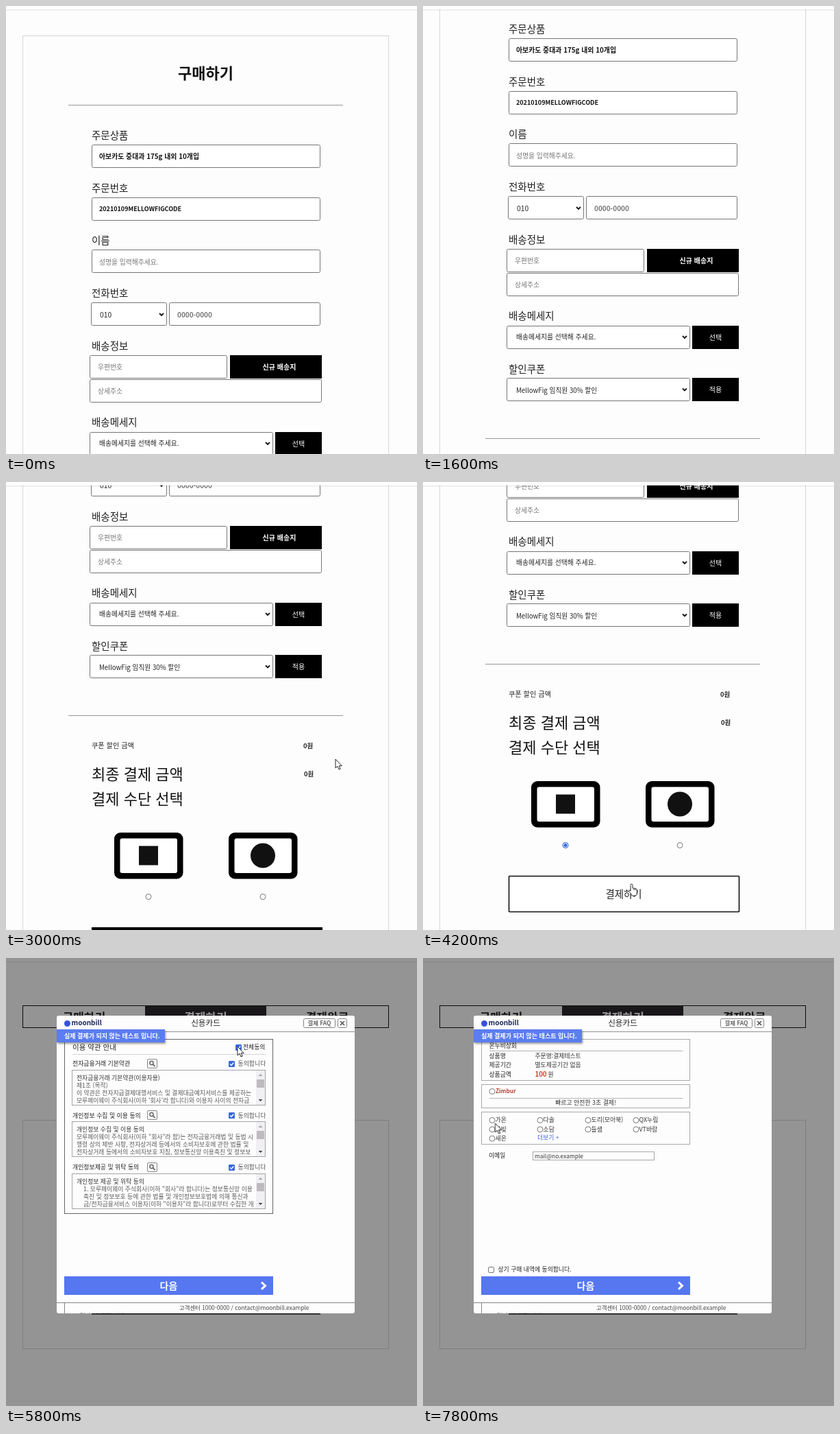
An HTML page for the animation above (8000 ms loop, 600x653 px).

```html
<!DOCTYPE html>
<html lang="ko">
<head>
<meta charset="utf-8">
<title>구매하기</title>
<style>
html, body { margin: 0; width: 100%; height: 100%; overflow: hidden; background: #fefdfe; }
svg { display: block; width: 600px; height: 653px; }
text { font-family: "Noto Sans CJK KR", "Noto Sans CJK", "Noto Sans", sans-serif; white-space: pre; }
.step { animation: 8s step-end infinite; }
</style>
</head>
<body>
<svg id="stage" viewBox="0 0 600 653"></svg>
<script>
const PAGE = '#fefdfe', INK = '#222', GREY = '#757575', BLUE = '#5677f0';

// Drawing helpers; text is placed by the vertical middle of its line.
const text = (x, mid, size, str, fill = INK, weight = 400, anchor = 'start') =>
  `<text x="${x}" y="${(mid + size * .38).toFixed(1)}" font-size="${size}" fill="${fill}" font-weight="${weight}" text-anchor="${anchor}">${str}</text>`;
const centred = (x, mid, size, str, fill, weight) => text(x, mid, size, str, fill, weight, 'middle');
const fillBox = (x, y, r, b, fill, round = 0) =>
  `<rect x="${x}" y="${y}" width="${r - x}" height="${b - y}" rx="${round}" fill="${fill}"/>`;
const frame = (x, y, r, b, stroke = '#767676', round = 0, fill = 'none', width = 1) =>
  `<rect x="${x + .5}" y="${y + .5}" width="${r - x - 1}" height="${b - y - 1}" rx="${round}" fill="${fill}" stroke="${stroke}" stroke-width="${width}"/>`;
const path = (d, stroke, width = 1, fill = 'none') =>
  `<path d="${d}" fill="${fill}" stroke="${stroke}" stroke-width="${width}"/>`;
const rule = (x, r, y, stroke) => path(`M${x} ${y + .5}H${r}`, stroke);
const radio = (x, y) => `<circle cx="${x}" cy="${y}" r="4" fill="#fff" stroke="#767676"/>`;
const group = (id, body) => `<g id="${id}" class="step">${body}</g>`;

// Stepped keyframes from [ms, value] pairs.
const rules = [];
function track(id, prop, keys) {
  const body = keys.map(([ms, v]) => `${ms / 80}%{${prop}:${v}}`).join('');
  rules.push(`@keyframes ${id}{${body}}#${id}{animation-name:${id}}`);
}
const visible = (id, ...times) =>
  track(id, 'opacity', [[0, 0], ...times.map((ms, i) => [ms, 1 - i % 2])]);
const move = (id, keys) =>
  track(id, 'transform', keys.map(([ms, x, y]) => [ms, `translate(${x}px,${y}px)`]));

// Order form
const label = (mid, str) => text(125, mid, 14.5, str, INK, 300);
const field = (x, y, r) => frame(x, y, r, y + 34, '#767676', 2, '#fff');
const chevron = (x, y) => path(`M${x - 3} ${y - 1.5}l3 3l3 -3`, '#111', 1.8);
const darkButton = (x, y, r, str, mid, weight) =>
  fillBox(x, y, r, y + 34, '#000') + centred(mid, y + 17, 10, str, '#fff', weight);
const payCard = (x, mark) =>
  fillBox(x, 956, x + 100.5, 1023.5, '#000', 9) + fillBox(x + 8.5, 964.5, x + 92, 1015, '#fff', 3) + mark;

const form = [
  frame(24, 43, 559, 1400, '#d6d4dc'),
  centred(291.5, 97.5, 22, '구매하기', '#111', 700),
  rule(91, 492, 144, '#98969a'),
  label(188, '주문상품'), field(125, 202, 459),
  text(136, 219, 9.9, '아보카도 중대과 175g 내외 10개입', '#111', 700),
  label(265, '주문번호'), field(125, 279, 459),
  text(136, 296, 9, '20210109MELLOWFIGCODE', '#111', 700),
  label(341.5, '이름'), field(125, 355, 459),
  text(136, 373, 9.8, '성명을 입력해주세요.', GREY),
  label(418, '전화번호'), field(124, 432, 235), field(238, 432, 459),
  text(137, 450, 10.3, '010'), chevron(227, 449.5),
  text(250, 450, 10, '0000-0000', GREY, 700),
  label(495, '배송정보'), field(122, 509, 323), field(122, 544, 461),
  text(134, 526.5, 9.8, '우편번호', GREY),
  darkButton(327, 509, 461, '신규 배송지', 399, 700),
  text(134, 561, 9.8, '상세주소', GREY),
  label(606.5, '배송메세지'), field(122, 621, 390), chevron(382, 637.5),
  text(136, 637.5, 9.8, '배송메세지를 선택해 주세요.'),
  darkButton(393, 621, 461, '선택', 427, 400),
  label(684, '할인쿠폰'), field(122, 697, 390), chevron(382, 714),
  text(136, 715, 9.7, 'MellowFig 임직원 30% 할인'),
  darkButton(393, 697, 461, '적용', 427, 400),
  rule(91, 492, 785, '#98969a'),
  text(125, 829.5, 10.2, '쿠폰 할인 금액'), text(434, 829.5, 9.4, '0원', INK, 700),
  text(125, 870.5, 22, '최종 결제 금액', '#111', 300), text(435, 870.5, 9.4, '0원', INK, 700),
  text(125, 906.5, 22, '결제 수단 선택', '#111', 300),
  payCard(158, fillBox(194, 975.5, 222, 1003.5, '#111')),
  payCard(325, '<circle cx="375" cy="989.5" r="18" fill="#111"/>'),
  radio(208, 1049.5), radio(375, 1049.5),
  group('chosen', '<circle cx="208" cy="1049.5" r="4" fill="#fff" stroke="#2f6be6"/><circle cx="208" cy="1049.5" r="2.5" fill="#2f6be6"/>'),
  fillBox(125, 1094, 462, 1147, '#000'), centred(293, 1120.5, 14.4, '결제하기', '#fff', 300),
  group('hover', frame(125, 1094, 462, 1147, '#111', 1, '#fff', 1.6) + centred(293, 1120.5, 14.4, '결제하기', INK, 300)),
].join('');

// Checkout page behind the popup
const checkout = [
  fillBox(0, 0, 600, 653, PAGE),
  frame(24, 69, 559, 102, '#111'), fillBox(203, 69, 380, 102, '#2b282d'),
  centred(114, 86, 17, '구매하기', INK, 700),
  centred(291.5, 86, 17, '결제하기', '#fff', 700),
  centred(469, 86, 17, '결제완료', INK, 700),
  frame(24, 236, 559, 570, '#d6d4dc'),
  fillBox(125, 466, 459, 519.5, '#111'),
].join('');

const header = fillBox(0, 0, 600, 5, PAGE) + fillBox(0, 5, 600, 6, 'rgba(0,0,0,.07)') + fillBox(0, 6, 600, 7, 'rgba(0,0,0,.04)');

// Popup
const box = (x, y) => frame(x, y, x + 9, y + 9, '#767676', 1.5, '#fff');
const tick = (x, y) => fillBox(x, y, x + 9, y + 9, '#3867e0', 1.5) + path(`M${x + 2} ${y + 4.5}l2 2l3.3 -4`, '#fff', 1.4);
const lens = y => frame(206, y - 7, 221, y + 7, '#8a8a8a', 1.5, '#f4f4f4') +
  `<circle cx="212.5" cy="${y - 1}" r="2.6" fill="none" stroke="#555" stroke-width="1.2"/>` + path(`M214.5 ${y + 1}l3 3`, '#555', 1.6);

function term(y, title, lines, indent) {
  const top = Math.floor(y) + 9;
  const bar = fillBox(365, top + 1, 378, top + 51, '#f0eff1') + fillBox(366, top + 14, 377, top + 26, '#bdbbbe') +
    `<path d="M368.500 ${top + 9}h6l-3 -3z" fill="#a3a3a3"/><path d="M368.500 ${top + 43}h6l-3 3z" fill="#444"/>`;
  return text(97, y, 8.9, title, INK, 500) + lens(Math.floor(y)) + box(325, Math.floor(y) - 4) + text(338.5, y, 8.9, '동의합니다', '#555') +
    frame(96, top, 379, top + 52, '#a5a3a6') + bar +
    lines.map((s, i) => text(i ? 103 + indent : 103, top + 11.5 + i * 11.2, 8.8, s, i ? '#5a5a5a' : '#333')).join('');
}

const terms = [
  frame(85, 118, 390, 373, '#666'),
  text(97, 130, 10.5, '이용 약관 안내'), box(335, 126), text(346, 130, 8.8, '전체동의', INK, 500),
  rule(97, 379, 140, '#d5d3d6'),
  term(154, '전자금융거래 기본약관', ['전자금융거래 기본약관(이용자용)', '제1조 (목적)',
    '이 약관은 전자지급결제대행서비스 및 결제대금예치서비스를 제공하는',
    "모루페이웨이 주식회사(이하 '회사'라 합니다)와 이용자 사이의 전자금"], 0),
  term(229.5, '개인정보 수집 및 이용 동의', ['개인정보 수집 및 이용 동의',
    '모루페이웨이 주식회사(이하 "회사"라 함)는 전자금융거래법 및 동법 시',
    '행령 상의 제반 사항, 전자상거래 등에서의 소비자보호에 관한 법률 및',
    '전자상거래 등에서의 소비자보호 지침, 정보통신망 이용촉진 및 정보보'], 0),
  term(305, '개인정보제공 및 위탁 동의', ['개인정보 제공 및 위탁 동의',
    '1. 모루페이웨이 주식회사(이하 "회사"라 합니다)는 정보통신망 이용',
    '촉진 및 정보보호 등에 관한 법률 및 개인정보보호법에 의해 통신과',
    '금/전자금융서비스 이용자(이하 "이용자"라 합니다)로부터 수집한 개'], 10),
  group('ticks', tick(335, 126) + [150, 225, 301].map(y => tick(325, y)).join('')),
].join('');

const banks = ['가온', '다솔', '도리(모아북)', 'QX누림', '나빛', '소담', '들샘', 'VT바람', '새온'];
const bank = (name, i) => {
  const x = 101 + i % 4 * 70, y = 236.5 + Math.floor(i / 4) * 13.3;
  return radio(x, y) + text(x + 4.5, y - .7, 8.9, name, '#333');
};

const order = [
  fillBox(80, 119, 394, 380, PAGE),
  frame(85, 118, 390, 179, '#a9a7aa'),
  text(96.5, 128, 8.8, '온누비상회', INK, 500), rule(97, 379, 135, '#b5b3b6'),
  text(96.5, 142.5, 8.8, '상품명', INK, 500), text(163.5, 142.5, 8.8, '주문명:결제테스트', '#333'),
  text(96.5, 156, 8.8, '제공기간', INK, 500), text(163.5, 156, 8.8, '별도제공기간 없음', '#333'),
  text(96.5, 169.5, 8.8, '상품금액', INK, 500), text(163.5, 169.5, 9.6, '100', '#d2401c', 700),
  text(182.5, 169.5, 8.8, '원', '#333'),
  frame(85, 184, 390, 219, '#a9a7aa'), radio(101, 194.5),
  text(106, 194, 8.2, 'Zimbur', '#b8423a', 700), rule(97, 379, 204, '#b5b3b6'),
  centred(237.5, 210.5, 8.9, '빠르고 안전한 3초 결제!', '#333'),
  frame(85, 224, 390, 272, '#a9a7aa'), banks.map(bank).join(''),
  text(167, 262, 8.8, '더보기 +', '#3f62d8'),
  text(96, 288, 8.8, '이메일', INK, 500), frame(160, 282, 338, 295, '#a9a7aa'),
  text(163, 288.5, 8.4, 'mail@no.example', '#333'),
  box(95, 450), text(109.5, 453.5, 8.8, '상기 구매 내역에 동의합니다.'),
].join('');

const popupBody = [
  '<circle cx="89.500" cy="95.500" r="4.500" fill="#3652dc"/>',
  text(95.5, 94.5, 10, 'moonbill', '#1e2a5a', 700),
  centred(291.5, 95, 11.6, '신용카드'),
  frame(434, 88, 481, 102, '#858386', 2, '#fff'), centred(457.5, 95, 8.4, '결제 FAQ', '#666', 700),
  frame(484, 88, 498, 102, '#858386', 2, '#fff'), path('M488 92l6 6M494 92l-6 6', '#555', 1.7),
  rule(74, 509, 107, '#8f8d92'),
  terms, group('order', order),
  '<rect x="74" y="104" width="158" height="19" fill="#5b7df0" style="filter:drop-shadow(1px 2px 1.5px rgba(0,0,0,.4))"/>',
  text(85, 113.5, 9, '실제 결제가 되지 않는 테스트 입니다.', '#fff', 700),
  fillBox(85, 464, 390, 491, BLUE), centred(237.5, 477.5, 14, '다음', '#fff', 700),
  path('M373 472.500l5.500 5.200l-5.500 5.200', '#fff', 3),
  rule(74, 509, 502, '#858386'), path('M85.500 502V518', '#858386'),
  text(253, 510, 8.4, '고객센터 1000-0000 / contact@moonbill.example', '#444'),
  text(96, 521.5, 9, '◦ 결제 안내(일시불)', '#666'),
].join('');

// The loader washes the popup out so that its white equals the dimmed page.
const popup = fillBox(74, 84, 509, 518, PAGE, 3) +
  `<g clip-path="url(#sheet)">${group('content', popupBody)}</g>` +
  group('loader', fillBox(74, 84, 509, 518, 'rgba(76,75,76,.59)', 3) +
    `<g transform="translate(289.500 302)">${group('spin', path('M11 -6A12.500 12.500 0 0 1 -3.500 12', '#5b7cf0', 3))}</g>`);

const arrow = '<path d="M0 0V13L3 10.300L5 15L7.200 14.100L5.200 9.700H9.300Z" fill="#fff" stroke="#111" stroke-width=".9"/>';
const hand = '<path d="M3 0Q4.500 0 4.500 1.500V6Q11 6 11 9V12Q11 17 9 17H3.500Q2 13.500 -1 10.500Q-1 8 1.500 10V1.500Q1.500 0 3 0ZM6.500 6.500V9M8.800 7V9" fill="#fff" stroke="#111" stroke-width=".9"/>';

document.getElementById('stage').innerHTML = [
  `<clipPath id="sheet">${fillBox(74, 84, 509, 518, '#000', 3)}</clipPath>`,
  fillBox(0, 0, 600, 653, PAGE),
  group('scroll', form), group('checkout', checkout), header,
  group('dim', fillBox(0, 0, 600, 653, 'rgba(0,0,0,.415)')),
  group('popup', popup),
  group('status', '<path d="M0 645H56Q59 645 59 648V653H0Z" fill="#dfdfe5"/>'),
  group('arrowOn', group('arrow', arrow)), group('handOn', group('hand', hand)),
].join('');

move('scroll', [[0, 0], [600, 18], [800, 58], [1000, 95], [1200, 122], [1400, 142], [1600, 155],
  [1800, 162], [2000, 165], [2400, 205], [2600, 290], [2800, 375], [3000, 445], [3200, 497], [3400, 520]]
  .map(([ms, y]) => [ms, 0, -y]));
visible('chosen', 3800);
visible('hover', 4000);
visible('checkout', 4600);
visible('dim', 4600);
visible('popup', 4800);
visible('content', 5000);
visible('loader', 4800, 5200);
track('spin', 'transform', [[0, 'rotate(-120deg)'], [5000, 'rotate(0deg)']]);
visible('ticks', 5600);
visible('order', 6800);
visible('status', 4800, 5400, 6800, 7200);
visible('arrowOn', 2800, 4000, 4600);
visible('handOn', 4000, 4600);
move('arrow', [[0, 481, 404], [3200, 400, 465], [3400, 290, 510], [3600, 220, 525], [3800, 207, 528],
  [4600, 370, 420], [4800, 410, 300], [5000, 424, 228], [5200, 412, 195], [5400, 372, 152], [5600, 338, 129],
  [6000, 302, 220], [6200, 252, 380], [6400, 225, 472], [6800, 205, 425], [7000, 170, 350],
  [7200, 132, 290], [7400, 110, 255], [7600, 105.5, 241]]);
move('hand', [[0, 262, 572], [4200, 301.5, 586]]);

const sheet = document.createElement('style');
sheet.textContent = rules.join('\n');
document.head.append(sheet);
</script>
</body>
</html>
```
